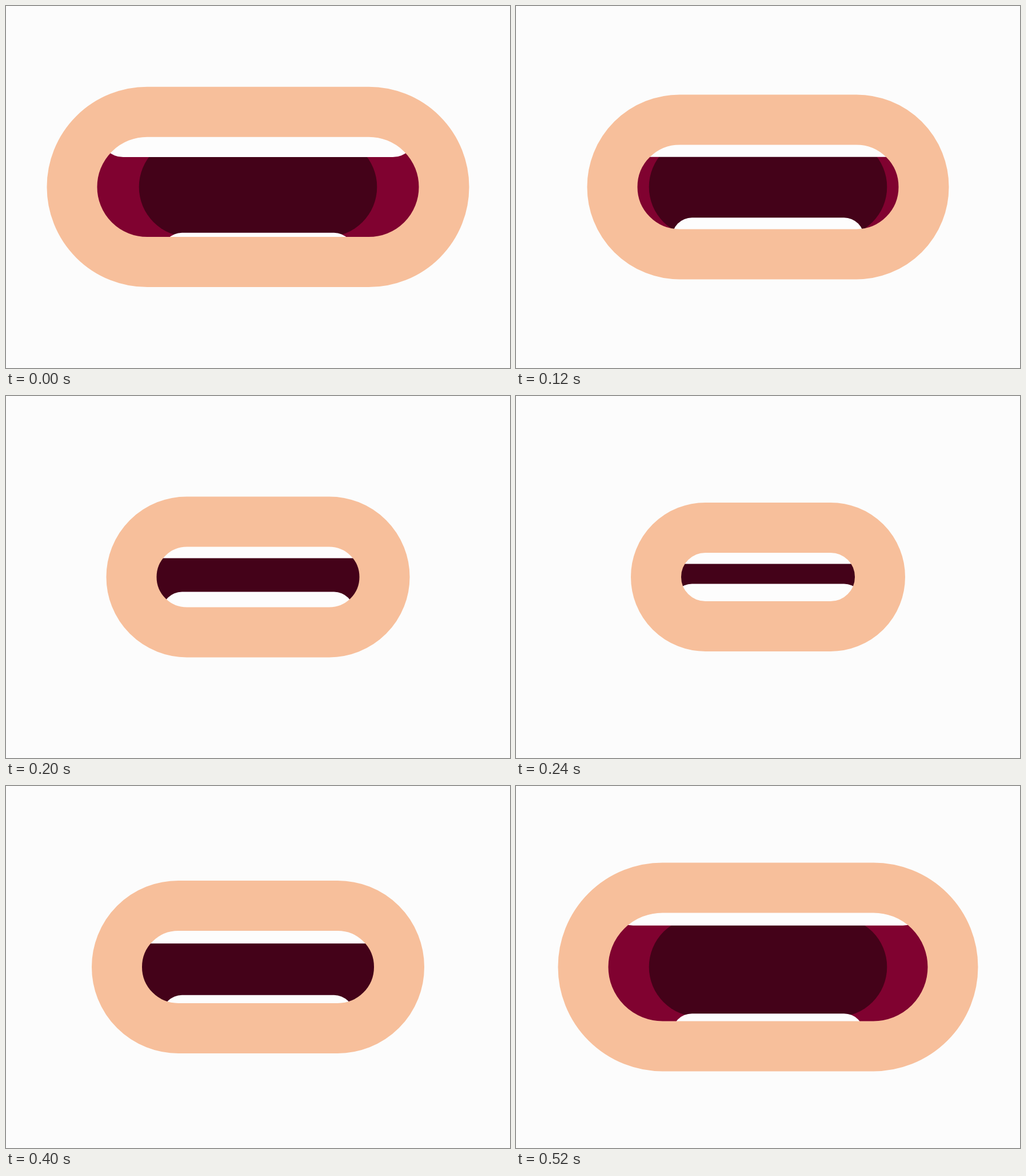
Write an HTML page with a canvas that moves like this. It is 882 px wide and 635 px high and loops after 560 ms.

```html
<!DOCTYPE html>
<html lang="en">
<head>
<meta charset="utf-8">
<title>Talking mouth</title>
<style>
  html, body { margin: 0; height: 100%; overflow: hidden; background: #fcfcfc; }
  canvas { display: block; }
</style>
</head>
<body>
<canvas id="stage" width="882" height="635"></canvas>
<script>
const ctx = document.getElementById('stage').getContext('2d');
const STEP = 40, STEPS = 14, LAST = STEPS - 1;
const CX = 441, CY = 317.4, LIP = 88;

// Starts each loop at rest, then goes evenly from open to shut and back; turn is the step when shut
function move(step, rest, open, shut, turn = 7) {
  if (step === 0) return rest;
  const end = step < turn ? 1 : LAST;
  return shut + (open - shut) * (step - turn) / (end - turn);
}

function roundBox(halfWidth, top, height, radius, color) {
  ctx.beginPath();
  ctx.roundRect(CX - halfWidth, top, halfWidth * 2, height, radius);
  ctx.fillStyle = color;
  ctx.fill();
}

function pill(halfWidth, halfHeight, color) {
  roundBox(halfWidth, CY - halfHeight, halfHeight * 2, halfHeight, color);
}

function draw(step) {
  const halfWidth = move(step, 369.5, 367.5, 214.5) - LIP / 2;
  const halfHeight = move(step, 175.7, 183, 120) - LIP / 2;
  const upperEdge = move(step, 265.1, 244.7, 306, 7.15);
  const lowerEdge = move(step, 397.8, 399.2, 326.2, 6.24);
  ctx.clearRect(0, 0, 882, 635);

  ctx.save();
  pill(halfWidth, halfHeight, '#800230');
  ctx.clip();
  pill(208.3, 87.5, '#440219');
  roundBox(275, upperEdge - 150, 150, 39, '#fdfdfd');
  roundBox(168, lowerEdge, 150, 35, '#fdfdfd');
  ctx.restore();

  pill(halfWidth, halfHeight, 'transparent');
  ctx.lineWidth = LIP;
  ctx.strokeStyle = '#f7bf9b';
  ctx.stroke();
}

function tick() {
  draw(Math.floor(performance.now() / STEP) % STEPS);
  requestAnimationFrame(tick);
}
tick();
</script>
</body>
</html>
```
